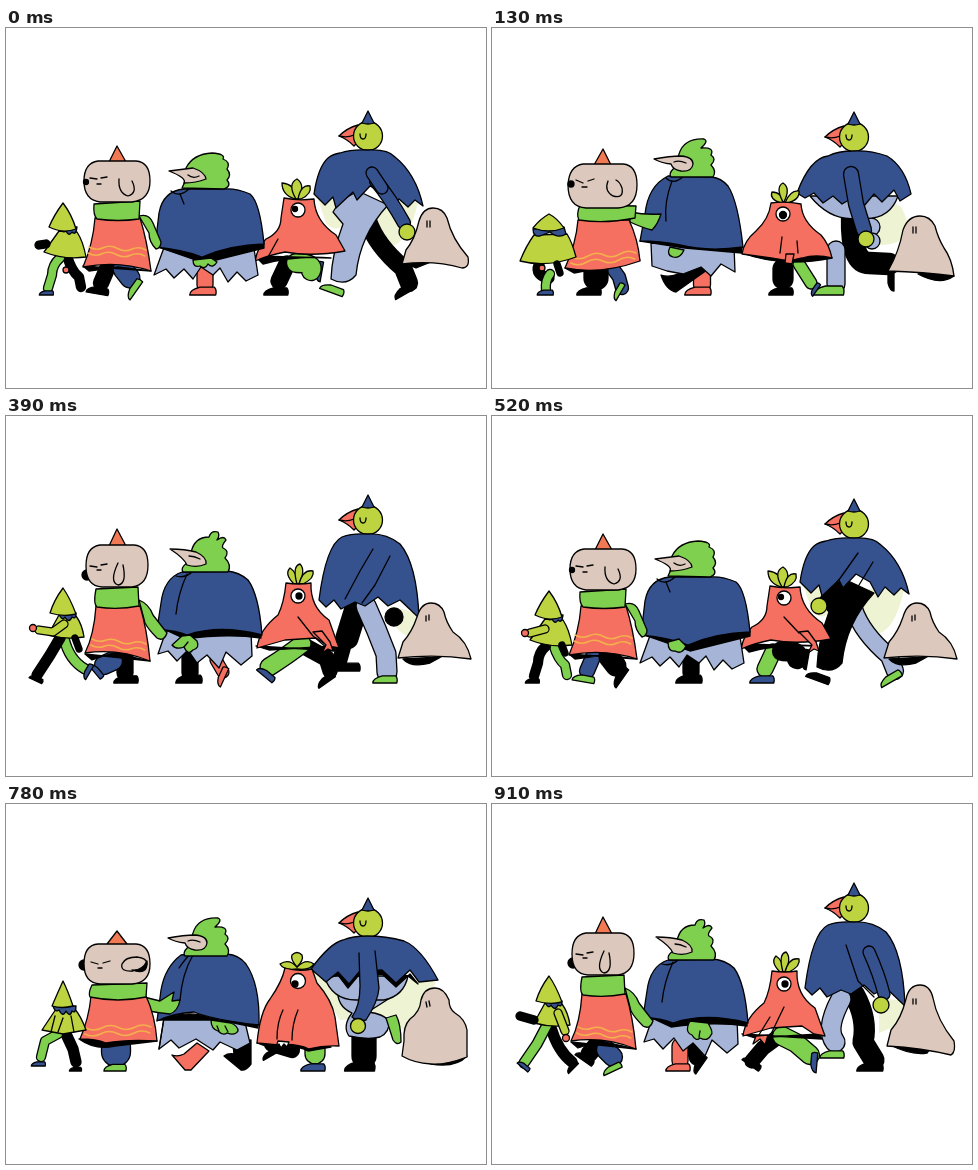
These frames come from a looping animation (480 by 360 pixels, 1040 ms). An HTML page:

```html
<!DOCTYPE html>
<html lang="en">
<head>
<meta charset="utf-8">
<title>Walking parade</title>
<style>
html, body { margin: 0; width: 100%; height: 100%; overflow: hidden; background: #fff; }
svg { display: block; width: 100vw; height: 100vh; }
</style>
</head>
<body>
<svg id="stage" viewBox="0 0 480 360" stroke-linejoin="round" stroke-linecap="round"></svg>
<script>
const STEP = 130, COUNT = 8, LINE = 1.3;
const INK = {
  k: '#000', w: '#fff', n: 'none', b: '#35528f', l: '#a5b4d7', r: '#f57060',
  g: '#7ed04e', y: '#bdd440', t: '#dcc8bc', p: '#eef3d3', h: '#f17a55', s: '#f3b04c'
};
const SHOE = 'M-11 0Q-11-4-3-6H8Q10-4 9 0Z';

// Parts: "c path" filled, "cN path" limb N wide, "c.x,y,r" dot, "c^x,y,turn,scale" shoe
function part(text) {
  const [, key, wide, kind, rest] = text.trim().match(/^([a-z])(\d*)([.^]?)\s*(.*)$/);
  const fill = INK[key], v = rest.split(',');
  const edge = key === 'p' ? 'none' : '#000';
  if (kind === '.') return `<circle cx="${v[0]}" cy="${v[1]}" r="${v[2]}" fill="${fill}" stroke="#000" stroke-width="${LINE}"/>`;
  if (kind === '^') {
    const size = v[3] || 1;
    return `<path d="${SHOE}" transform="translate(${v[0]} ${v[1]}) rotate(${v[2] || 0}) scale(${size})" fill="${fill}" stroke="#000" stroke-width="${LINE / size}"/>`;
  }
  if (wide) {
    const line = (c, w) => `<path d="${rest}" fill="none" stroke="${c}" stroke-width="${w}"/>`;
    return line('#000', +wide + LINE) + line(fill, wide - LINE);
  }
  if (key === 's') return `<path d="${rest}" fill="none" stroke="${fill}" stroke-width="1.5"/>`;
  return `<path d="${rest}" fill="${fill}" stroke="${edge}" stroke-width="${LINE}"/>`;
}
const draw = spec => spec ? spec.split(';').map(part).join('') : '';
const at = (x, y, spec, turn = 0) => `<g transform="translate(${x} ${y}) rotate(${turn})">${draw(spec)}</g>`;

// Same pose with the other leg leading
function swap(spec, leg, shoe) {
  return spec.split(';').map(s => {
    const c = s[1] === '^' ? shoe : leg;
    return (s[0] === 'k' ? c : s[0] === c ? 'k' : s[0]) + s.slice(1);
  }).join(';');
}
function gait(leg, shoe, p) {
  p[4] = swap(p[0], leg, shoe);
  p[1] = swap(p[5], leg, shoe);
  return p;
}

const ghostTall = 't M427 180Q417 180 413 193Q409 211 400 222L396 236Q428 232 456 240Q464 240 462 229Q446 211 441 190Q437 180 427 180Z;n M421 193v6;n M424 193v6';
const ghostRun = 'k M397 243Q405 252 424 247L435 241Z;t M425 187Q415 187 411 201Q406 216 397 226L392 242Q430 238 465 243Q461 225 447 216Q440 206 438 196Q434 187 425 187Z;n M420 200v5;n M423 199v5';
const ghostLow = 'k M426 246Q448 258 462 248L450 244Z;t M428 188Q416 188 411 202Q407 224 396 243Q432 244 462 248Q460 231 452 220Q446 210 443 198Q438 188 428 188Z;n M421 199v6;n M424 199v6';
const ghost = {
  body: [
    'k M396 234L410 240 425 234Z;' + ghostTall,
    ghostLow,
    't M426 184Q416 184 412 196Q410 212 402 221Q393 231 393 239Q410 237 425 240Q440 247 465 238Q466 228 462 219Q459 211 449 209Q440 203 438 193Q435 184 426 184Z;n M420 198l1 5;n M423 197l1 5',
    ghostRun, ghostRun, ghostLow,
    'k M425 260Q450 264 461 252L445 252Z;t M429 184Q418 184 415 196Q414 208 404 215Q397 222 398 237L396 252Q408 259 425 260Q440 261 461 253V226Q459 215 449 209Q443 205 443 196Q438 184 429 184Z;n M420 198l1 5;n M423 197l1 5',
    'k M396 240Q420 252 435 249L440 242Z;t M428 181Q417 181 414 195Q409 215 399 226L395 242Q430 244 459 251Q464 248 462 237Q445 216 441 194Q438 181 428 181Z;n M421 195v5;n M424 195v5'
  ], legs: [], arms: []
};

const tallHead = 'r M-10-11Q-21-8-29 0Q-21 3-14 10L-8 4Z;n M-29 0Q-21 2-14-1;y.0,0,14.5;n M-8-2Q-8 3-5 3Q-2 3-2-2;b M0-25L-6-13Q0-11 6-13Z';
const tall = {
  body: [
    'b M334 125Q346 121 362 122Q382 121 389 129Q410 146 417 178L409 172 402 179 393 171 386 181 378 166 364 158 351 172 347 164 330 180 327 169 319 177 308 166Q312 139 322 130Q327 126 334 125Z',
    'l M318 168Q339 194 366 190Q397 194 406 168Z;b M336 128Q318 130 305 165L313 170 322 165 331 175 341 168 350 176 362 169 372 178 382 166 390 174 402 162 408 173 419 166Q413 139 395 128Q378 122 361 123Q346 123 336 128Z',
    'l M318 172Q326 196 350 196H378Q398 192 402 172Z;k M318 176L332 171 342 184 352 172 376 170 390 183 404 170 412 180 402 172 376 164 330 166Z;b M337 136Q324 139 305 165L320 178 332 168 343 180 353 168 376 166 390 179 404 166 413 178 432 176Q415 144 398 137Q380 132 361 132Q347 132 337 136Z',
    'b M336 121Q320 129 313 184L320 191 328 184 335 193 349 186 359 190 372 181 382 190 394 184 413 202Q411 148 394 128Q380 117 362 118Q346 117 336 121Z'
  ],
  head: [[362, 108], [362, 109], [362, 119], [362, 104]],
  legs: gait('l', 'g', [
    'p M312 171L320 195Q330 207 342 193L377 218Q401 223 412 174Z;k17 M362 193Q370 217 397 240L403 255;k^401,265,-30,1.2;l M334 173L352 163 382 177Q354 207 350 247Q340 259 325 251Q326 225 337 196L327 184Z;g^326,265,20,1.2',
    '',
    'p M306 166L318 190 332 216 372 214 404 232 430 178Z;k15 M362 217L383 217 389 233;l29 M357 190V249;g^357,267,0,1.5',
    'p M385 190L414 198 407 220Q397 222 387 207Z;k.388,201,9;k22 M350 193L341 222;k14 M340 222L333 247;k^342,255,0,1.3;l20 M360 190Q371 214 380 238L381 256;g^380,267,0,1.2',
    '',
    'p M393 168L410 180 420 205Q398 222 380 215L364 190Z;k.379,199,9;k.380,213,8;l21 M360 190Q359 235 377 235L397 236;g^402,252,-90;k18 M344 222V256;k^338,267,0,1.5',
    'p M306 166L318 190 334 216 384 212 404 234 430 178Z;k24 M358 232V252;k^355,267,0,1.5;l M332 184Q330 202 346 209Q336 222 343 232Q362 236 374 233Q384 228 383 217Q378 210 362 208L384 194Z;g M380 214L390 211Q395 220 395 238Q391 242 387 236Z',
    'p M387 194L414 197 408 220 387 229Z;k20 M362 190Q376 215 371 238L382 256;k^379,267,0,1.3;l20 M349 195Q333 225 343 238;g^341,254,0,1.2'
  ]),
  arms: [
    'b13 M370 153Q384 170 398 195;b12 M366 145L376 160;y.401,204,8',
    'b15 M359 146L364 176 372 202;y.374,211,8',
    'y.335,215,8;b M352 147L354 182Q349 198 337 206Q341 213 347 216Q368 202 371 184L370 147',
    'n M367 133L354 155 339 183;n M384 140L369 169 356 187',
    'n M366 137L349 161 334 180;n M381 146L364 174;y.327,190,8',
    'b16 M360 146V181Q358 198 346 202;n M353 142L352 177;y.338,213,8',
    'b M353 149L354 182Q354 202 346 213Q352 218 360 216Q372 198 373 184L369 147;y.352,222,7.5',
    'n M354 141L366 177 382 193;b12 M377 148Q387 170 392 190;y.389,201,8'
  ]
};

const leaves = [
  'y M289 171Q276 167 276 155Q289 156 292 171Z;y M290 171Q281 156 291 151Q300 157 292 171Z;y M292 171Q295 156 304 158Q306 166 295 171Z',
  'y M289 175Q277 171 280 164Q290 164 291 175Z;y M291 174Q283 159 291 155Q299 160 292 174Z;y M293 175Q298 162 307 163Q308 172 295 175Z',
  'y M291 165Q278 167 274 160Q283 154 291 163Q300 154 308 160Q303 167 291 165Z;y M291 163Q284 155 286 151Q291 146 296 151Q298 156 291 163Z',
  'y M288 168Q278 158 284 152Q292 157 291 168Z;y M291 168Q286 150 294 148Q300 154 293 168Z;y M293 168Q297 153 307 155Q309 162 297 168Z'
];
const redBody = [
  'k M249 228L257 236Q290 227 325 230Z;r M278 170Q292 173 308 171Q309 193 330 207L339 223Q306 229 279 224Q263 227 249 233Q252 218 260 211Q275 204 275 190Z;w.292,182,7',
  'k M250 225Q290 240 340 230L328 227Z;r M279 175Q294 173 309 176Q310 194 329 207Q337 216 340 230Q324 226 310 230L297 233 279 230 250 226Q252 213 264 203Q277 191 279 175Z;w.291,186,7',
  'k M251 239L262 243Q290 240 302 247L325 243Z;r M279 164Q292 168 306 165L311 179Q326 196 329 213L333 242Q318 241 303 245Q290 239 272 241L251 239Q254 208 264 195Q276 178 279 164Z;w.292,177,7.5',
  'k M250 230L263 234 327 230 330 235Z;r M280 167Q293 169 305 167Q304 191 323 204L333 232 322 230 310 222 279 224 251 232Q253 214 272 199Q278 187 280 167Z;w.292,180,7'
];
const red = {
  body: redBody.map((b, i) => leaves[i] + ';' + b),
  legs: gait('g', 'b', [
    'k16 M281 236L273 253;k^271,267,0,1.2;b^316,243,-80;g19 M290 235Q309 235 305 243',
    '',
    'b^262,252,-60,.8;g17 M266 238Q264 245 276 244;k19 M307 238V253;k^307,267,0,1.1',
    'k16 M298 230L320 242;k14 M320 242L324 255;k^322,266,-35;g18 M296 228Q282 239 263 251;b^259,261,40',
    '',
    'k12 M307 236L319 255;k^325,262,-55,.7;g20 M291 241V251;b^290,267,0,1.2',
    'k15 M266 240L286 246;k^265,252,-30,.8;g20 M309 243V250;b^308,267,0,1.2',
    'k14 M290 230L271 244 260 257;k^259,262,35;g19 M290 232L304 239 318 251;b^325,258,-85'
  ]),
  arms: [
    'k.289,181,2.5;n M272 211L262 229', 'k.291,187,3.5;n M290 209L288 225;n M305 213L306 225;r M294 226L293 235 300 236 302 226Z',
    'k.294,174,3.5;n M292 202Q291 217 302 231;n M303 204Q313 212 315 233;w M303 231L299 237 303 239 305 235 306 239 309 239 310 235 313 238 315 232Z',
    'k.293,180,3;n M292 201L307 220 321 232;r M307 216L320 229 316 237 322 233 327 235 324 226 316 215Z',
    'k.289,181,2.5;n M292 201L307 217;r M307 216L320 229 316 237 322 233 327 235 324 226 316 215Z',
    'k.291,187,3.5;r11 M294 216L295 240;n M288 214L289 244;r M290 240V250L294 244 295 251 299 249V240Z',
    'k.289,180,3;n M277 206Q271 218 271 235;n M292 206Q286 220 286 236;w M272 237L270 243 273 240 275 244 278 240 281 243 283 238Z',
    'k.293,180,3;n M278 213L265 234;n M292 203L278 232;r M264 232L261 240 268 235 273 241 276 231Z'
  ]
};

const crest = 'g M179 152Q176 149 182 143L187 129Q192 113 212 114Q217 116 209 123Q223 122 219 130Q225 134 219 140Q225 146 221 152Z;t M162 134Q178 131 189 131Q201 132 201 139Q200 147 189 146Q181 145 179 139Q169 138 162 134Z;n M182 137Q187 135 194 138';
const crestTurned = 'g M176 160Q181 151 180 140Q187 126 206 125Q220 126 217 131Q225 134 221 141Q226 147 221 152Q226 158 218 161Z;t M163 143L187 140Q199 144 200 151Q190 155 178 155Q181 150 163 143Z;n M182 147Q187 151 193 148';
const crestLow = 'g M177 156Q174 152 181 147L185 137Q188 121 203 121Q205 114 212 116Q214 120 211 124Q218 119 220 124Q215 130 217 132Q224 135 219 142Q226 149 222 156Z;t M164 133Q179 133 190 136Q201 141 200 148Q191 152 181 149Q178 142 164 133Z;n M183 140Q188 140 194 143';
const toe = 'l12 8-18 19h-6l-13-15q6 2 12-1z', heel = 'l18-5v24q-5 7-10 6l-17-14q4-3 10-2z';
const cape = {
  body: [
    'l M160 214L148 247 160 241 168 250 178 241 187 251 195 239 207 247 214 240 222 254 231 244 240 253 252 247 247 214Z;k M149 218L198 235 258 220V214Z;b M178 161Q157 163 153 185L149 219Q178 222 196 229Q224 217 258 216Q254 174 244 166Q230 160 218 161Z;n M165 163Q173 170 183 161;n M174 166L178 176',
    'l M159 215L160 238 175 243 191 246 209 239 219 248 229 236 243 244 242 218Z;k M148 213L193 220 250 225V217Z;b M176 148Q156 158 153 186L148 213Q168 213 188 217Q216 224 251 219Q246 173 236 158Q229 150 220 149Z;n M174 150Q182 158 193 147;n M180 153Q172 174 174 193',
    'l M158 214L153 245 165 236 173 244 190 235 207 246 214 238 231 246 244 239 238 214Z;n M158 214L153 245;k M151 216Q184 205 204 214L252 224V216Z;b M175 151Q159 163 155 186L151 217Q168 209 188 208Q208 216 253 221Q254 180 240 160Q233 151 221 150H184Z;n M184 150Q177 158 173 164;n M187 151Q176 170 174 196',
    'l M160 215L152 238 162 235 171 245 182 234 191 247 201 239 213 252 220 236 235 249 246 240 245 215Z;k M151 210L179 223Q222 217 255 222V217Z;b M176 156Q158 162 155 187L151 213Q172 215 181 219Q214 208 256 219Q253 179 242 164Q233 156 221 155Z;n M170 160Q180 163 188 154;n M181 158Q172 178 170 198'
  ],
  crest: [[0, 0, crestTurned], [0, -3, crest], [0, 0, crest], [0, 0, crestLow]],
  legs: gait('r', 'r', [
    'r16 M199 238V257;r^198,267,0,1.3',
    '',
    `k M187 239${toe};r M216 241${heel}`,
    'r12 M210 244L217 256;r^219,261,-65;k16 M184 238V257;k^184,267,0,1.3',
    '',
    'k17 M210 238V257;k^207,267,0,1.3;r M205 235L215 242 184 264Q174 262 169 247Q182 252 205 235Z',
    `r M191 239${toe};k M227 241${heel}`,
    'k13 M201 242L204 254;k^210,261,-55;r16 M188 242V257;r^187,267,0,1.2'
  ]),
  arms: [
    'g M187 232Q187 240 194 238Q199 242 202 236Q207 241 211 234L205 230Z',
    'g M178 219Q174 227 181 229Q188 231 192 222Z',
    'g M178 211Q173 219 162 222Q158 228 166 229Q174 233 185 222L192 211Z;n M168 227L177 219;n M174 229L181 222',
    'g M176 220L166 229Q170 234 178 231Q182 240 187 234Q194 232 191 225L184 219Z;n M178 231L182 226',
    'g M176 226Q176 236 183 235Q190 239 194 230L187 223Z',
    'g M201 223Q203 233 209 235Q217 236 218 226Z;n M209 234L210 228',
    'g M205 216Q205 225 212 227Q217 232 221 229Q229 232 232 227Q232 222 225 219Z;n M213 227L211 222;n M222 228L219 222',
    'g M198 217Q192 228 200 231Q204 238 208 234Q216 238 219 231Q222 229 216 219Z;n M207 233L208 227'
  ]
};

const stripes = (x, y, w, tilt) => [0, 6].map(d =>
  `s M${x - d / 5} ${y + d}q${w / 8} 4 ${w / 4} ${tilt / 4}` + `t${w / 4} ${tilt / 4}`.repeat(3)).join(';');
const pig = {
  body: [
    'k M77 238L83 243 112 239 145 243Z;g M133 188Q143 185 147 195L155 214Q155 220 150 221Q143 214 143 205Z;r M89 190Q87 216 77 239Q112 232 145 243Q141 212 134 190Z;' + stripes(83, 219, 57, 3) + ';g M88 176Q87 187 91 191Q112 194 133 191L134 173Z;h M111 118L103 134H120Z;t M92 133H130Q144 134 144 153Q144 172 126 174H94Q78 172 78 153Q78 135 92 133Z;n M84 150L91 151;n M95 150L101 149;n M91 156H95;k.80,154,2.5;n M113 151Q112 165 122 168Q132 165 126 153',
    'k M73 240L82 245 108 240 148 232Z;g M138 184Q153 187 169 186Q166 196 160 202Q151 200 138 194Z;r M86 192Q84 216 73 240Q108 247 148 233Q146 211 137 192Z;' + stripes(80, 229, 64, -4) + ';g M88 177Q84 187 87 192Q113 196 143 190L144 178Z;h M111 121L102 137H119Z;t M91 136H131Q145 137 145 157Q145 179 126 180H94Q76 179 76 157Q77 138 91 136Z;n M84 152L91 155;n M96 153L102 151;n M90 159H95;k.79,156,3;n M116 153Q112 163 121 168Q132 171 130 160Q128 154 124 152',
    'k M73 235Q90 247 109 242L151 237Z;k.78,161,5;g M138 193L154 197 168 188 166 197 174 196Q172 207 164 210Q152 209 138 206Z;r M85 192Q83 214 74 235Q90 235 100 239Q122 235 151 237Q149 211 140 192Z;' + stripes(80, 224, 65, -1) + ';g M86 181Q82 189 84 193Q112 199 140 193L141 179Z;h M111 127L101 140Q111 143 121 140Z;t M92 140H130Q144 141 144 160Q144 179 126 180H94Q78 179 78 160Q78 141 92 140Z;n M85 158L92 160;n M97 159L104 157;n M92 164H96;k M141 157Q142 172 126 166Q136 167 141 157Z;n M127 167Q114 168 116 160Q119 153 131 153Q141 154 141 160',
    'k M79 238L86 244 107 237 144 245Z;k.81,159,5;g M133 184Q143 188 147 199L161 217Q158 226 151 222Q142 213 139 207Z;r M90 190Q88 219 79 237Q112 232 144 245Q141 213 134 190Z;' + stripes(86, 223, 54, 5) + ';g M90 173Q87 188 91 191Q112 194 133 190L132 171Z;h M111 113L103 130H120Z;t M94 129H128Q142 130 142 149Q142 169 126 171H96Q80 170 80 150Q80 131 94 129Z;n M84 150L91 151;n M95 149L101 148;n M91 154H95;n M112 147Q103 166 112 169Q121 168 117 149'
  ],
  legs: gait('b', 'g', [
    'k15 M101 241L95 255;k^92,266,10,1.1;b20 M117 241L124 250;g^131,262,-55,1.1',
    '',
    'b22 M114 242V247;k23 M109 243V252;k^110,267,0,1.1',
    'k16 M119 240V257;k^121,267,0,1.2;b19 M107 245L98 249;b^89,257,50,.9',
    '',
    'k13 M119 238L127 249 130 260;k^129,264,-60,.9;b24 M104 243V250;g^98,267,0,1.2',
    'b29 M110 243V248;g^110,267,0,1.1',
    'k16 M105 240L97 250;k^92,257,35;b19 M114 246L121 253;g^122,267,-25'
  ]),
  arms: []
};

const elf = {
  body: [
    'y M53 203L38 224Q58 232 80 229Q77 213 71 204Z;b M53 199Q56 206 60 203Q63 209 66 204Q70 208 71 199Z;y M57 175Q48 187 43 199Q57 206 70 201Q66 187 57 175Z',
    'y M42 207Q34 218 28 233Q55 240 84 229Q80 214 75 206Z;b M41 201Q41 209 48 208L58 204Q66 211 74 206L72 199Z;y M57 186Q48 191 41 200Q57 206 72 200Q65 190 57 186Z',
    'y M50 205L36 226 57 230 80 226Q75 212 68 204Z;n M49 212L45 228;n M65 212L68 228;b M47 202Q49 209 53 206Q57 214 60 207Q64 214 66 207Q70 210 70 202Z;y M57 177Q52 188 46 202Q56 205 67 202Q62 187 57 177Z',
    'y M53 199L42 219Q60 224 78 221Q76 208 70 200Z;b M52 196Q56 206 59 201Q63 208 66 201Q70 204 70 197Z;y M57 172Q48 184 44 197Q57 201 70 198Q64 182 57 172Z'
  ],
  legs: gait('g', 'b', [
    'k9 M61 228Q66 244 73 249L75 259;g9 M54 230Q46 237 46 247L42 260;b^41,267,0,.7',
    '',
    'k9 M48 230L38 241 35 254;k^34,262,0,.7;g10 M60 229L67 246 70 258;b^70,267,0,.5',
    'g10 M58 222Q63 244 79 253;b^84,256,-60,.8;k10 M54 222L44 239 31 259;k^30,265,25,.7',
    '',
    'g10 M47 237Q43 247 57 250;k9 M58 246Q53 252 54 262;k^54,267,0,.8',
    'k10 M60 230L67 245 70 258;k^70,267,0,.6;g9 M52 230L39 237 35 253;b^33,262,0,.7',
    'k10 M59 224Q66 247 80 258;k^82,264,-45,.7;g10 M55 221L45 240 32 259;b^31,264,40,.7'
  ]),
  arms: [
    'k8 M40 216L33 217;r.60,242,3', 'k6 M65 236L68 245;r.50,240,3',
    'y8 M49 214L38 224;r.31,227,3', 'y8 M58 208L47 216 33 214;r.27,212,3.5;k6 M69 222L73 233',
    'y8 M53 213L38 217;r.33,217,3.5;k6 M70 229L73 237', 'n M57 216L57 235;k6 M66 238L68 247;r.61,245,3',
    'n M57 214L52 228', 'k8 M42 216L28 212;y8 M66 209L73 227;r.74,234,3.5'
  ]
};

const cast = [tall, ghost, red, cape, pig, elf];
function pose(i) {
  const q = i % 4;
  return cast.map(c => {
    let out = draw(c.legs[i]);
    if (c.head) out += at(...c.head[q], tallHead);
    out += draw(c.body[i % c.body.length]);
    if (c.crest) out += at(...c.crest[q]);
    return out + draw(c.arms[i]);
  }).join('');
}

const stage = document.getElementById('stage');
const poses = Array.from({ length: COUNT }, (_, i) => pose(i));
let shown = -1;
const start = performance.now();
function tick() {
  const i = Math.floor(Math.max(0, performance.now() - start) / STEP) % COUNT;
  if (i !== shown) stage.innerHTML = poses[shown = i];
  requestAnimationFrame(tick);
}
tick();
</script>
</body>
</html>
```
